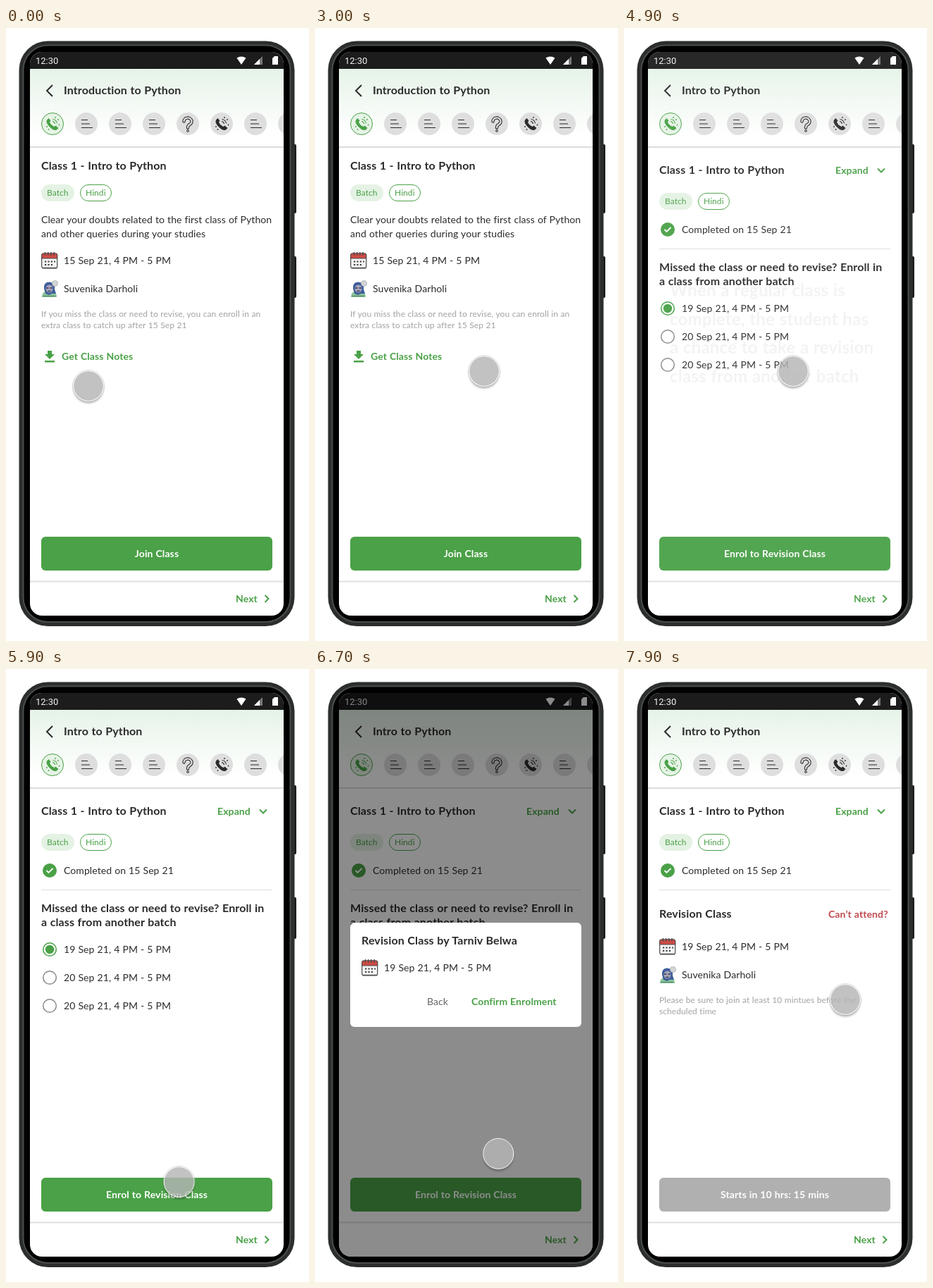
Animation of 430 by 870 pixels, one loop 8 s. Source, as an HTML page:

```html
<!DOCTYPE html>
<html lang="en">
<head>
<meta charset="utf-8">
<title>Class screen</title>
<style>
html, body { margin: 0; width: 100%; height: 100%; overflow: hidden; background: #fff; }
svg { display: block; width: 430px; height: 870px; }
text { font: 400 14px Lato, sans-serif; letter-spacing: .006em; word-spacing: .025em; white-space: pre; }
text.bold { font-weight: 700; letter-spacing: .008em; }
text.status { font: 400 13px Roboto, sans-serif; letter-spacing: 0; }
</style>
</head>
<body>
<svg id="stage" viewBox="0 0 430 870" xmlns="http://www.w3.org/2000/svg"></svg>
<script>
const GREEN = '#4aa147', INK = '#2b2b2b', GREY = '#a2a2a2';
const TEACHER = 'Suvenika Darholi', TUTOR = 'Tarniv Belwa';

// Drawing helpers
const text = (x, y, s, { size = 14, fill = INK, bold = false, anchor = 'start' } = {}) =>
  `<text x="${x}" y="${y}" fill="${fill}" text-anchor="${anchor}" style="font-size:${size}px"${bold ? ' class="bold"' : ''}>${s}</text>`;
const rect = (x, y, w, h, r, fill, more = '') =>
  `<rect x="${x}" y="${y}" width="${w}" height="${h}" rx="${r}" fill="${fill}" ${more}/>`;
const circle = (x, y, r, fill, more = '') => `<circle cx="${x}" cy="${y}" r="${r}" fill="${fill}" ${more}/>`;
const line = (d, stroke, width = 2, more = '') =>
  `<path d="${d}" fill="none" stroke="${stroke}" stroke-width="${width}" ${more}/>`;
const at = (x, y, s) => `<g transform="translate(${x} ${y})">${s}</g>`;
const layer = (id, s) => `<g id="${id}">${s}</g>`;
const heading = (x, y, s) => text(x, y, s, { size: 16, bold: true });

const handset = c =>
  `<path d="M-8-5.500L-5.500-8-2.500-4.500-4-2.500Q-2 2 2.500 4L4.500 2.500 8.500 6 6 8.500Q2 10.500-4 4.500T-8-5.500Z" fill="${c}"/>` +
  line('M0-3.500A4 4 0 0 1 3.500 0M.5-6.500A7 7 0 0 1 6.500-.5', c, 1.1) +
  circle(4, -9, .9, c) + circle(8, -6, .9, c) + circle(9.500, 1.500, .9, c) + circle(-8, 4, .9, c) + circle(-5.500, 8, .9, c);

const glyphs = {
  P: handset,
  L: c => line('M-7-5.500h9M-7 0h12M-7 5.500h16', c, 1.1),
  Q: c => {
    const hook = 'M-5.500-3.500a5.500 5 0 1 1 8 4.500Q0 2.500 0 5.500';
    return line(hook, c, 4.400, 'stroke-linecap="round"') + line(hook, '#dedede', 2.200, 'stroke-linecap="round"') +
      circle(0, 10, 1.400, '#dedede', `stroke="${c}"`);
  }
};

const strip = [...'PLLLQPLLLPLL'].map((kind, i) => at(66 + 48 * i, 136,
  i ? circle(0, 0, 16, '#dedede') + glyphs[kind](INK)
    : circle(0, 0, 15.500, '#e6f3e6', `stroke="${GREEN}"`) + glyphs[kind](GREEN))).join('');

const calendar = (x, y) => at(x, y,
  rect(.7, 2, 22, 21, 2.500, '#f4f4f4', 'stroke="#4b4b4b" stroke-width="1.200"') +
  `<path d="M.7 9V4.500Q.7 2 3 2H20.500Q22.700 2 22.700 4.500V9Z" fill="#cf4b46" stroke="#4b4b4b"/>` +
  line('M5.500 0v5M9.700 0v5M13.800 0v5M18 0v5', '#5a4a4a', 1.400) +
  line('M5 13.500h15M5 18h11', '#3d3d3d', 2.200, 'stroke-dasharray="2.200 2.200"') +
  line('M2 22.500h20', '#555', 1.500));

const avatar = (x, y) => at(x, y,
  `<path d="M1 24Q1 16 8 15.500L17 16Q22 17 22 24Z" fill="#8cc59a"/>` +
  `<path d="M4 12Q3 3 11 2.500Q20 3 19 13L21 19H15L11 21 6 19Z" fill="#3f5f9c"/>` +
  `<ellipse cx="11.500" cy="12" rx="5" ry="5.500" fill="#a9a3b5"/>` +
  line('M7 11h3.500M12.500 11H16M9.500 15.500h4', '#2d3d66', 1.300) +
  circle(19.500, 4.500, 4, '#d3d6d6', 'stroke="#a8adad" stroke-width=".8"') +
  line('M2 22.500h18', '#5d8f70', 1.500));

const chips = y =>
  rect(50, y, 47, 24, 12, '#e4f2e4') + text(58, y + 16, 'Batch', { size: 12, fill: GREEN }) +
  rect(105.500, y + .5, 44, 23, 11.500, '#fff', `stroke="${GREEN}"`) + text(113, y + 16, 'Hindi', { size: 12, fill: GREEN });

const button = (label, fill = GREEN) =>
  rect(50, 722, 328, 48, 6, fill) + text(214, 751, label, { fill: '#fff', bold: true, anchor: 'middle' });

const note = (y, ...rows) => rows.map((s, i) => text(50, y + 16 * i, s, { size: 12, fill: GREY })).join('');

const radio = (y, label, on) =>
  circle(62, y, 9.300, '#fff', `stroke="${on ? GREEN : '#8a8a8a'}" stroke-width="1.500"`) +
  (on ? circle(62, y, 6.200, GREEN) : '') + text(82, y + 5, label);

// Screens
const lesson =
  heading(82, 94, 'Introduction to Python') +
  heading(50, 201, 'Class 1 - Intro to Python') + chips(222) +
  text(50, 277, 'Clear your doubts related to the first class of Python') +
  text(50, 297, 'and other queries during your studies') +
  calendar(50, 318) + text(82, 335, '15 Sep 21, 4 PM - 5 PM') +
  avatar(50, 358) + text(82, 375, TEACHER) +
  note(410, 'If you miss the class or need to revise, you can enroll in an', 'extra class to catch up after 15 Sep 21') +
  `<path d="M59 458h6v5h4l-7 7-7-7h4ZM55 472h14v2.500H55Z" fill="${GREEN}"/>` +
  text(79, 471, 'Get Class Notes', { fill: GREEN, bold: true }) + button('Join Class');

const revise =
  heading(82, 94, 'Intro to Python') +
  heading(50, 207, 'Class 1 - Intro to Python') +
  text(300, 207, 'Expand', { fill: GREEN, bold: true }) + line('M360 199.500l5 5 5-5', GREEN) +
  chips(234) + circle(62, 286, 10, GREEN) + line('M57.500 286l3 3 6-6', '#fff', 1.800) +
  text(82, 291, 'Completed on 15 Sep 21') + rect(50, 313, 328, 1, 0, '#dedede') +
  heading(50, 345, 'Missed the class or need to revise? Enroll in') + heading(50, 365, 'a class from another batch') +
  radio(398, '19 Sep 21, 4 PM - 5 PM', true) + radio(438, '20 Sep 21, 4 PM - 5 PM') +
  radio(478, '20 Sep 21, 4 PM - 5 PM') + button('Enrol to Revision Class');

const booked =
  rect(34, 316, 360, 468, 0, '#fff') + heading(50, 353, 'Revision Class') +
  text(290, 353, 'Can’t attend?', { fill: '#bf4a4e', bold: true }) +
  calendar(50, 382) + text(82, 399, '19 Sep 21, 4 PM - 5 PM') +
  avatar(50, 422) + text(82, 439, TEACHER) +
  note(474, 'Please be sure to join at least 10 mintues before the', 'scheduled time') +
  button('Starts in 10 hrs: 15 mins', '#b0b0b0');

const caption = rect(34, 34, 360, 800, 0, '#fff') +
  ['When a regular class is', 'complete, the student has', 'a chance to take a revision', 'class from another batch']
    .map((s, i) => text(65, 381 + 40.600 * i, s, { size: 24, fill: '#333', bold: true })).join('');

const scrim = rect(34, 34, 360, 800, 0, '#000', 'fill-opacity=".45"');

const dialog =
  rect(50, 360, 328, 148, 6, '#fff') + heading(66, 391, `Revision Class by ${TUTOR}`) +
  calendar(66, 412) + text(98, 429, '19 Sep 21, 4 PM - 5 PM') +
  text(159, 477, 'Back', { fill: '#666' }) + text(222, 477, 'Confirm Enrolment', { fill: GREEN, bold: true });

const phone =
  rect(405, 165, 7, 98, 2, '#1c1d1d') + rect(405, 324, 7, 59, 2, '#1c1d1d') +
  rect(18.500, 18.500, 391, 830.500, 41, '#2c2e2e') +
  rect(24.500, 24.500, 379, 818.500, 35, '#000', 'stroke="#4a4d4d" stroke-width="2"') +
  rect(28, 28, 372, 812, 31, '#000');

const statusBar = rect(34, 34, 360, 24, 0, '#1c1c1c') +
  '<text class="status" x="42" y="51" fill="#f2f2f2">12:30</text>' +
  '<path d="M327.500 42.500Q334 38.500 340.500 42.500L334 52Z" fill="#fff"/>' +
  '<path d="M352 52H364V40Z" fill="#777"/><path d="M352 52H360V44Z" fill="#fff"/>' +
  '<path d="M378 43l3-3h5v12h-8Z" fill="#fff"/>';

const chrome =
  rect(34, 34, 360, 800, 0, '#fff') + rect(34, 58, 360, 110, 0, 'url(#mint)') + statusBar +
  line('M66 81l-8 8 8 8', INK) + layer('strip', strip) +
  rect(34, 168, 360, 2, 0, '#dcdcdc') + rect(34, 784.500, 360, 2, 0, '#e0e0e0') +
  text(326, 815, 'Next', { fill: GREEN, bold: true }) + line('M367.500 805l5 5-5 5', GREEN);

const pointer =
  circle(0, 3, 21.500, '#000', 'opacity=".3" filter="url(#soft)" clip-path="url(#outside)"') +
  circle(0, 0, 21, '#b5b5b5', 'id="pad"') +
  circle(0, 0, 21.500, 'none', 'stroke="#fff"') +
  circle(0, 0, 22.300, 'none', 'stroke="#aaa" stroke-width=".5"');

document.getElementById('stage').innerHTML =
  `<defs>
    <linearGradient id="mint" x2="0" y2="1"><stop stop-color="#e6f3e8"/><stop offset=".85" stop-color="#fff"/></linearGradient>
    <clipPath id="screen">${rect(34, 34, 360, 800, 17, '#000')}</clipPath>
    <clipPath id="outside"><path d="M-30-30H30V30H-30ZM0-22A22 22 0 0 0 0 22A22 22 0 0 0 0-22Z" clip-rule="evenodd"/></clipPath>
    <filter id="soft" x="-30%" y="-30%" width="160%" height="160%"><feGaussianBlur stdDeviation="1.800"/></filter>
  </defs>` + phone +
  `<g clip-path="url(#screen)">` + chrome + layer('lesson', lesson) + layer('revise', revise) +
  layer('booked', booked) + layer('caption', caption) + layer('scrim', scrim) + layer('dialog', dialog) + '</g>' +
  layer('pointer', pointer);

// Timeline
const LOOP = 8000, STEP = 100, SCROLL = 232;
const el = id => document.getElementById(id);
const clamp = v => Math.max(0, Math.min(1, v));
const ramp = (t, a, b) => clamp((t - a) / (b - a));
const ease = p => p * p * (3 - 2 * p);

const path = [
  [0, 117, 508], [800, 345, 137], [1000, 345, 137], [1500, 113, 137], [1900, 113, 137],
  [2400, 345, 137], [2800, 240, 460], [3000, 240, 487], [5300, 240, 487], [6000, 246, 742],
  [6500, 246, 742], [7200, 318, 469], [7500, 318, 469], [7900, 314, 469]
];

function pointerAt(t) {
  const i = path.findIndex(k => k[0] > t);
  if (i < 0) return path[path.length - 1].slice(1);
  const [a, x, y] = path[i - 1], [b, u, v] = path[i];
  const p = ease(ramp(t, a, b));
  return [x + (u - x) * p, y + (v - y) * p];
}

const pressed = t => [[950, 1600], [1900, 2400], [6100, 6400], [7300, 7550]].some(([a, b]) => t >= a && t < b);

function fade(id, v) {
  el(id).setAttribute('opacity', v);
  el(id).setAttribute('display', v > 0 ? 'inline' : 'none');
}

function draw(t) {
  const [x, y] = pointerAt(t);
  const scroll = SCROLL * (ease(ramp(t, 1000, 1500)) - ease(ramp(t, 1900, 2400)));
  const done = ramp(t, 7400, 7760);
  const overlay = ramp(t, 6170, 6480) * (1 - done);
  el('strip').setAttribute('transform', `translate(${-scroll} 0)`);
  el('pointer').setAttribute('transform', `translate(${x} ${y})`);
  el('pad').setAttribute('opacity', pressed(t) ? .7 : .82);
  fade('lesson', t < 4200 ? 1 : 0);
  fade('revise', t < 4200 ? 0 : 1);
  fade('caption', ramp(t, 3400, 3800) * (1 - ramp(t, 4540, 4920)));
  fade('booked', done);
  fade('scrim', overlay);
  fade('dialog', overlay);
}

function tick(now) {
  draw(Math.floor((now % LOOP) / STEP) * STEP);
  requestAnimationFrame(tick);
}
draw(0);
requestAnimationFrame(tick);
</script>
</body>
</html>
```
